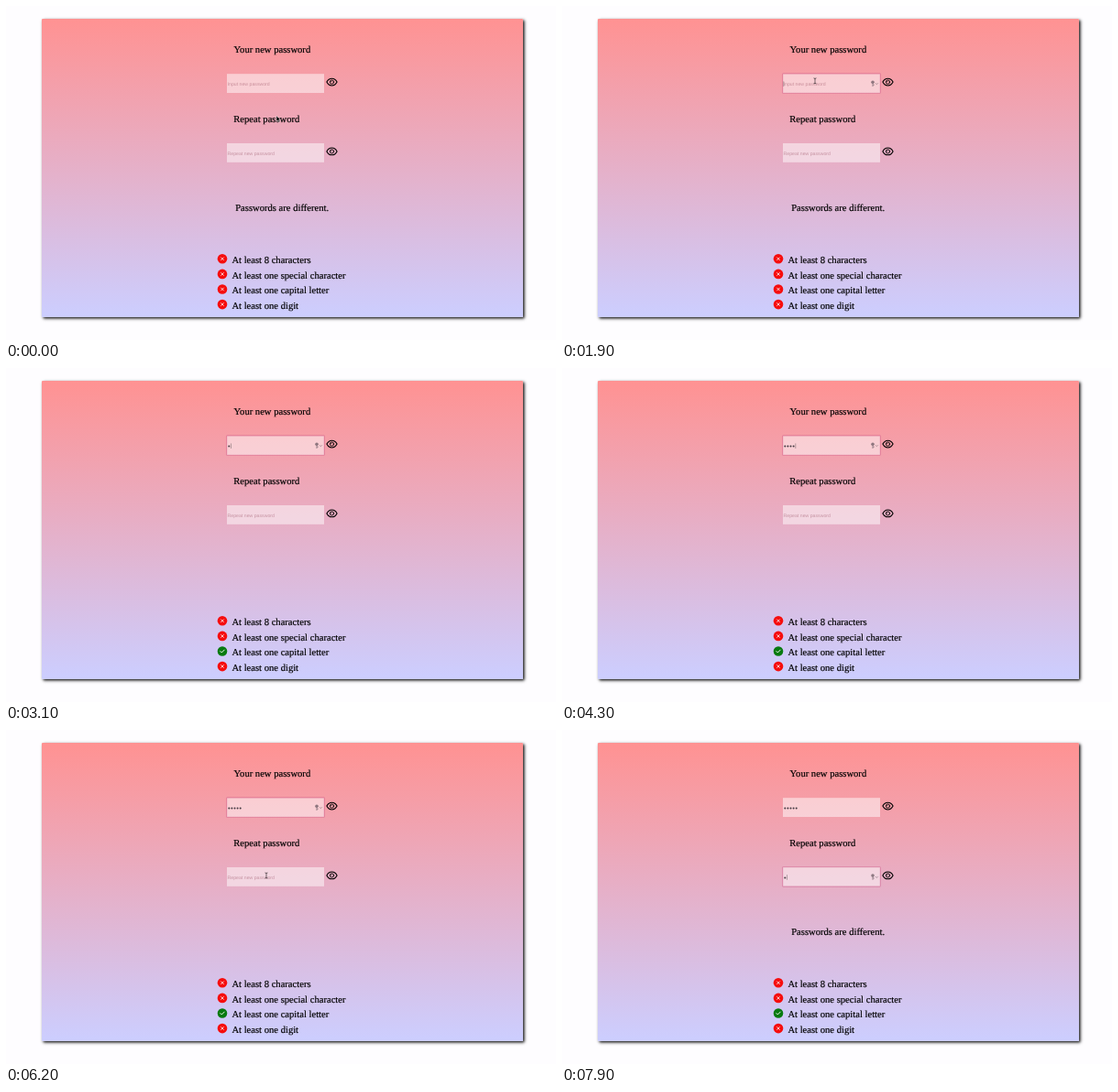
An HTML page for the animation above (8 s loop, 600 by 365 pixels).

```html
<!DOCTYPE html>
<html lang="en">
<head>
<meta charset="utf-8">
<title>Password form</title>
<style>
  html, body { margin: 0; width: 100%; height: 100%; overflow: hidden; background: #fefdff; }
  .card {
    position: absolute; left: 39px; top: 13.5px; width: 525px; height: 326.5px;
    border-radius: 1px;
    background: linear-gradient(#ff9292, #ccceff);
    box-shadow: 1.6px 1.6px 3.2px #111;
  }
  svg { position: absolute; left: 0; top: 0; display: block; }
  text {
    font: 10.6px "Liberation Serif", "Times New Roman", serif;
    text-rendering: geometricPrecision;
    fill: #000; stroke: #000; stroke-width: .18;
  }
  .hint { font: 5.2px "Liberation Sans", Arial, sans-serif; fill: #964a5e; fill-opacity: .48; stroke: none; }
  .box { fill: #fff; fill-opacity: .5; }
  .ring { fill: none; stroke: #c4487c; stroke-opacity: .38; stroke-width: 1.1; }
  .caret { stroke: #333; stroke-opacity: .7; stroke-width: .5; }
  .dots { fill: #453a42; }
  .line { fill: none; stroke-linecap: round; stroke-linejoin: round; }
</style>
</head>
<body>
<div class="card"></div>
<svg width="600" height="365" viewBox="0 0 600 365">
  <defs>
    <g id="eye" class="line" stroke="#000">
      <path d="M-5.6 0C-3 -5.2 3 -5.2 5.6 0C3 5.2 -3 5.2 -5.6 0Z" stroke-width="1.1"/>
      <circle r="2.1" stroke-width=".9"/>
      <circle cx="-.6" cy="-.6" r=".5" stroke="none" fill="#000"/>
    </g>
    <g id="bad">
      <circle r="5.3" fill="#f60d0d"/>
      <path class="line" d="M-1.4 -1.4L1.4 1.4M1.4 -1.4L-1.4 1.4" stroke="#fff" stroke-width=".8"/>
    </g>
    <g id="good">
      <circle r="5.3" fill="#087a10"/>
      <path class="line" d="M-2.1 .1L-.7 1.5L2.2 -1.4" stroke="#fff" stroke-width=".9"/>
    </g>
    <g id="key" opacity=".8">
      <circle cx="98" cy="9" r="1.8" fill="#75626b"/>
      <path class="line" d="M98 10V13.4M98.5 12H99.3" stroke="#75626b" stroke-width=".9"/>
      <path class="line" d="M101.3 10.4L102.4 11.4L103.5 10.4" stroke="#75626b" stroke-width=".7"/>
    </g>
  </defs>

  <text x="248.5" y="51">Your new password</text>
  <text x="248.3" y="126.7">Repeat password</text>
  <text id="message" x="250.2" y="224">Passwords are different.</text>

  <g id="fields"></g>
  <g id="rules"></g>

  <g id="pointer">
    <path id="arrow" d="M0 0V6.2L1.5 4.9L2.5 7.1L3.5 6.6L2.6 4.5H4.5Z" fill="#000" stroke="#fff" stroke-width=".4"/>
    <path id="beam" class="line" d="M-1.1 -3Q0 -3 0 -2.2Q0 -3 1.1 -3M0 -2.2V2.2M-1.1 3Q0 3 0 2.2Q0 3 1.1 3" stroke="#2b2228" stroke-width=".65"/>
  </g>
</svg>
<script>
const LOOP = 8000, PITCH = 3.1;
const $ = id => document.getElementById(id);
const show = (el, on) => el.style.display = on ? '' : 'none';

// One password field: when it has focus and when each character is typed
const fields = [
  { y: 74.2, hint: 'Input new password', focus: [1700, 6250], keys: [2900, 3400, 3750, 4150, 4650] },
  { y: 150, hint: 'Repeat new password', focus: [6250, LOOP], keys: [6550] }
];

$('fields').innerHTML = fields.map(f => `
  <g transform="translate(241 ${f.y})">
    <rect class="box" width="106" height="20.8"/>
    <rect class="ring" x="-.3" y="-.3" width="106.6" height="21.4" rx=".6"/>
    <text class="hint" x=".6" y="13.2">${f.hint}</text>
    <g class="dots">${f.keys.map((_, i) =>
      `<circle cx="${2.3 + i * PITCH}" cy="11.4" r="1"/>`).join('')}</g>
    <path class="caret" d="M0 8.2V13.8"/>
    <use href="#key"/>
    <use href="#eye" x="114.5" y="8.9"/>
  </g>`).join('');

fields.forEach((f, i) => {
  const g = $('fields').children[i];
  for (const name of ['ring', 'hint', 'caret']) f[name + 'El'] = g.querySelector('.' + name);
  f.dotEls = [...g.querySelectorAll('.dots circle')];
  f.keyEl = g.querySelector('[href="#key"]');
});

const rules = ['8 characters', 'one special character', 'one capital letter', 'one digit'];
$('rules').innerHTML = rules.map((rule, i) => {
  const y = 276.3 + i * 16.6;
  return `<use href="#bad" x="236" y="${y}"/><text x="246.4" y="${y + 4.6}">At least ${rule}</text>`;
}).join('');
const capital = $('rules').querySelectorAll('use')[2];

// Pointer stops: time, x, y
const path = [
  [0, 295, 120], [300, 295, 120], [1100, 276, 81.8], [5100, 276, 81.8],
  [5500, 361, 116], [5650, 361, 116], [6150, 284, 159], [LOOP, 284, 159]
];

function pointerAt(t) {
  const i = path.findIndex(p => p[0] > t);
  const [a, b] = [path[i - 1], path[i]];
  const k = (t - a[0]) / (b[0] - a[0]);
  const ease = k * k * (3 - 2 * k);
  return [a[1] + (b[1] - a[1]) * ease, a[2] + (b[2] - a[2]) * ease];
}

function drawField(f, t) {
  const typed = f.keys.filter(k => k <= t);
  const n = typed.length;
  const focused = t >= f.focus[0] && t < f.focus[1];
  const since = t - (n ? typed[n - 1] : f.focus[0]);
  show(f.ringEl, focused);
  show(f.keyEl, focused);
  show(f.hintEl, !n);
  show(f.caretEl, focused && since % 1000 < 500);
  f.caretEl.setAttribute('transform', `translate(${.8 + n * PITCH + (n ? .6 : 0)})`);
  f.dotEls.forEach((dot, i) => show(dot, i < n));
}

function draw(t) {
  fields.forEach(f => drawField(f, t));
  const first = fields[0].keys[0], second = fields[1].keys[0];
  show($('message'), t < first || t >= second);
  capital.setAttribute('href', t < first ? '#bad' : '#good');

  const [x, y] = pointerAt(t);
  const inside = x > 241 && x < 347 && fields.some(f => y > f.y && y < f.y + 21);
  $('pointer').setAttribute('transform', `translate(${x} ${y})`);
  show($('pointer'), t < first || (t >= 5100 && t < second));
  show($('arrow'), !inside);
  show($('beam'), inside);
}

const start = performance.now();
function tick() {
  draw((performance.now() - start) % LOOP);
  requestAnimationFrame(tick);
}
tick();
</script>
</body>
</html>
```
